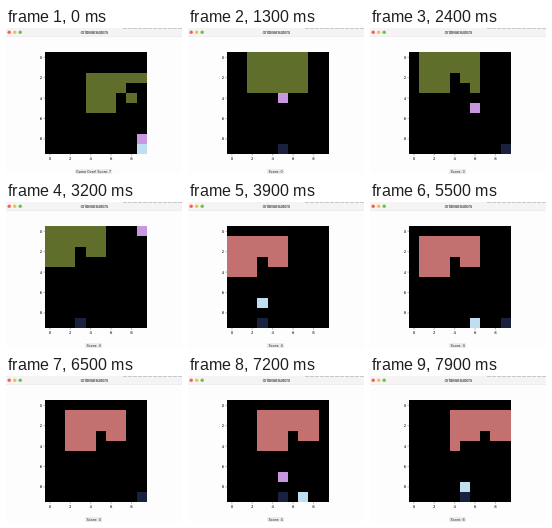
These frames come from a looping animation (176x146 px, 8000 ms). An HTML page:

```html
<!DOCTYPE html>
<html lang="en">
<head>
<meta charset="utf-8">
<title>GridMarauders</title>
<style>
  html, body { margin: 0; width: 100%; height: 100%; overflow: hidden; background: #fdfdfd; }
  svg { display: block; width: 100vw; height: 100vh; }
  .ui { font: 3.6px Inter, "Liberation Sans", sans-serif; text-anchor: middle; fill: #222; }
  .title { font-size: 3.8px; font-weight: 600; fill: #444; }
  .tick { font: 3.84px "DejaVu Sans", sans-serif; }
  #ticks path { stroke: #000; stroke-width: .35; }
  #board { shape-rendering: crispEdges; }
</style>
</head>
<body>
<svg viewBox="0 0 176 146" preserveAspectRatio="none">
  <rect width="176" height="146" fill="#fdfdfd"/>
  <rect width="176" height="8.5" fill="#f5f3f3"/>
  <path d="M0 8.5H176" stroke="#dedcdc" stroke-width=".4"/>
  <path d="M117 .3H176" stroke="#999" stroke-width=".6" stroke-dasharray="4 1"/>
  <circle cx="3.2" cy="4.2" r="1.7" fill="#f4605a"/>
  <circle cx="8.7" cy="4.2" r="1.7" fill="#f5bd4f"/>
  <circle cx="14.2" cy="4.2" r="1.7" fill="#61c454"/>
  <text class="ui title" x="88.3" y="5.6">GridMarauders</text>
  <g id="ticks"></g>
  <g id="board"><rect x="38.8" y="24.2" width="102" height="102"/></g>
  <rect id="plate" y="141" height="5" fill="#ececec"/>
  <text id="message" class="ui" x="87.6" y="144.8"></text>
</svg>
<script>
const LOOP = 8000, FRAME = 100, START = 814, STEP = 82.2;
const LEFT = 38.8, TOP = 24.2, CELL = 10.2;
const MOVE_EVERY = 12, SHOOT_EVERY = 10;
const COLORS = {
  cannon: '#1a213f', leftward: '#5f6e2b', rightward: '#c27070',
  shot: '#c798df', bomb: '#bfdff1'
};

// One key per game step: f = fire, l / r = move.
const KEYS = 'f....f....' + 'f.r..frrr.' + 'f..llllll.' + '.......r..' + '..r.rrrr..' +
             '..........' + '....l..r..' + 'llll.f....' + 'f.....';

const byId = id => document.getElementById(id);

function add(parent, tag, attrs, text = '') {
  const node = document.createElementNS('http://www.w3.org/2000/svg', tag);
  for (const name in attrs) node.setAttribute(name, attrs[name]);
  node.textContent = text;
  return parent.appendChild(node);
}

function block(x, y, w, h) {
  return Array.from({ length: w * h }, (_, i) => ({ x: x + i % w, y: y + Math.floor(i / w) }));
}

const copy = cells => cells.map(c => ({ ...c }));

function nearestAlien(aliens, x) {
  const rank = a => Math.abs(a.x - x) * 100 - a.y;
  return aliens.reduce((best, a) => rank(a) < rank(best) ? a : best);
}

function play() {
  let aliens = block(2, 0, 6, 4), shots = [], bombs = [];
  let x = 5, dir = -1, score = 0;
  return [...KEYS].map((key, i) => {
    const step = i + 1;
    if (key === 'f') shots.push({ x, y: 9 });
    if (key === 'l') x--;
    if (key === 'r') x++;
    shots.forEach(s => s.y--);
    bombs.forEach(b => b.y++);
    shots = shots.filter(s => s.y >= 0);
    bombs = bombs.filter(b => b.y <= 9);
    if (step > 1 && step % MOVE_EVERY === 1) {
      if (aliens.some(a => a.x === (dir < 0 ? 0 : 9))) {
        dir = -dir;
        aliens.forEach(a => a.y++);
      } else {
        aliens.forEach(a => a.x += dir);
      }
    }
    if (step > 1 && step % SHOOT_EVERY === 1) bombs.push({ ...nearestAlien(aliens, x) });
    const hit = (a, s) => a.x === s.x && a.y === s.y;
    const spent = shots.filter(s => aliens.some(a => hit(a, s)));
    aliens = aliens.filter(a => !spent.some(s => hit(a, s)));
    shots = shots.filter(s => !spent.includes(s));
    score += spent.length;
    return {
      message: 'Score: ' + score, plate: 17,
      cannon: [{ x, y: 9 }],
      [dir < 0 ? 'leftward' : 'rightward']: copy(aliens),
      shot: copy(shots), bomb: copy(bombs)
    };
  });
}

const gameOver = {
  message: 'Game Over! Score: 7', plate: 37,
  leftward: [...block(4, 2, 6, 1), ...block(4, 3, 4, 1), ...block(4, 4, 3, 2), { x: 8, y: 4 }],
  shot: [{ x: 9, y: 8 }], bomb: [{ x: 9, y: 9 }]
};
const states = [gameOver, ...play()];

for (let n = 0; n < 10; n += 2) {
  const mid = (n + .5) * CELL, bottom = TOP + 10 * CELL;
  add(byId('ticks'), 'path', { d: `M${LEFT} ${TOP + mid}h-1.3M${LEFT + mid} ${bottom}v1.3` });
  add(byId('ticks'), 'text', { class: 'tick', x: LEFT - 2.6, y: TOP + mid + 1.4, 'text-anchor': 'end' }, n);
  add(byId('ticks'), 'text', { class: 'tick', x: LEFT + mid, y: bottom + 5.7, 'text-anchor': 'middle' }, n);
}

const layers = {};
for (const name in COLORS) layers[name] = add(byId('board'), 'path', { fill: COLORS[name] });

const cellPath = ({ x, y }) => `M${LEFT + x * CELL} ${TOP + y * CELL}h${CELL}v${CELL}h${-CELL}z`;

let shown;
function draw(now) {
  const time = Math.floor(now % LOOP / FRAME) * FRAME;
  const step = Math.max(0, Math.floor((time - START) / STEP));
  const state = states[Math.min(step, states.length - 1)];
  if (state !== shown) {
    shown = state;
    for (const name in layers) layers[name].setAttribute('d', (state[name] || []).map(cellPath).join(''));
    byId('message').textContent = state.message;
    byId('plate').setAttribute('x', 87.6 - state.plate / 2);
    byId('plate').setAttribute('width', state.plate);
  }
}

const begin = performance.now();
function tick() {
  draw(performance.now() - begin);
  requestAnimationFrame(tick);
}
tick();
</script>
</body>
</html>
```
